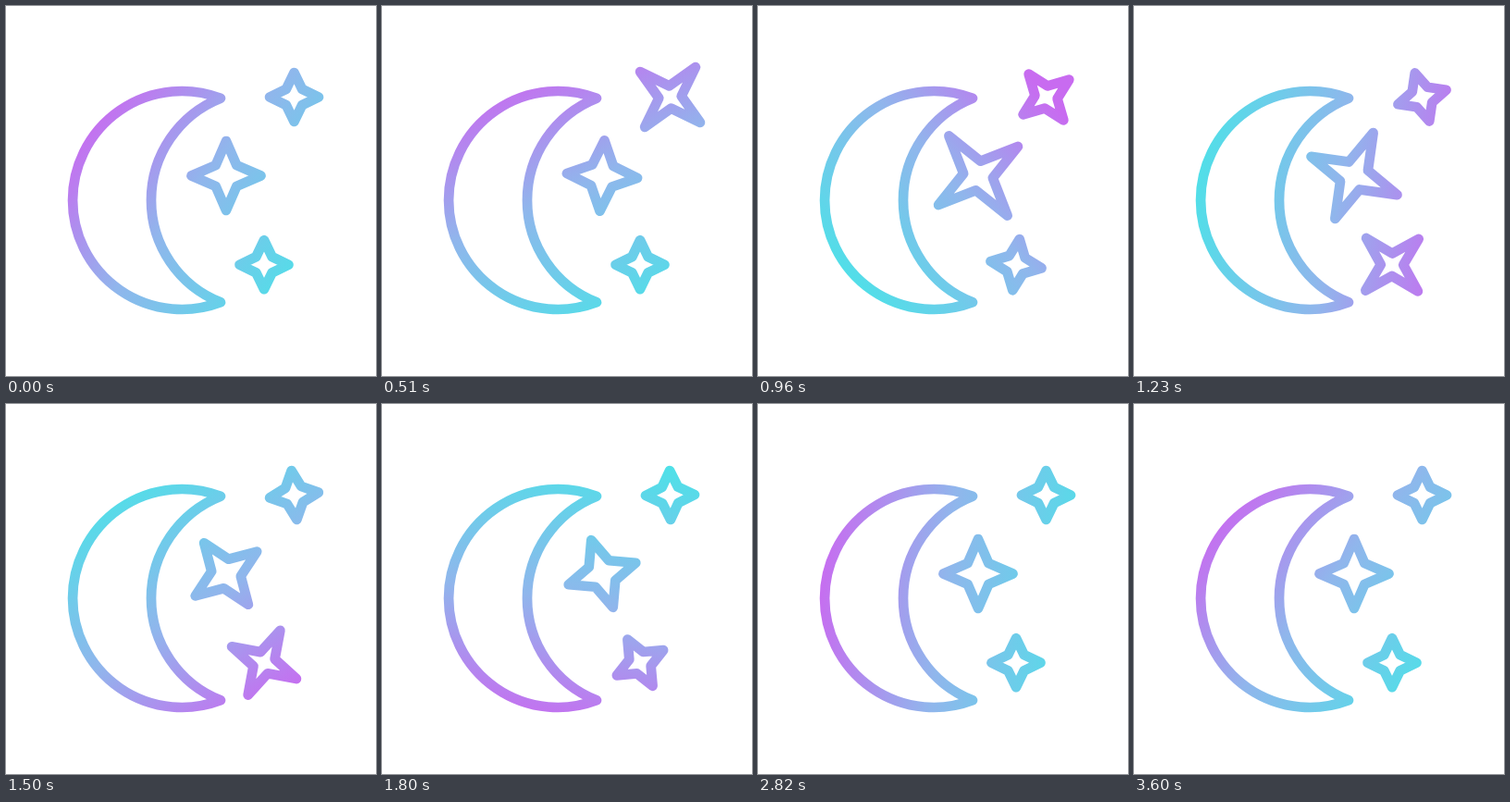
An HTML page for the animation above (5.63 s loop, 400x400 px).

```html
<!DOCTYPE html>
<html lang="en">
<head>
<meta charset="utf-8">
<title>Moon and stars</title>
<style>
  html, body { margin: 0; width: 100%; height: 100%; overflow: hidden; background: #fff; }
  svg { display: block; width: 100%; height: 100%; }
</style>
</head>
<body>
<svg viewBox="0 0 400 400">
  <defs>
    <linearGradient id="sheen" gradientUnits="userSpaceOnUse" x1="62" y1="205" x2="358" y2="205">
      <stop offset="0" stop-color="#c86bf0"/>
      <stop offset=".47" stop-color="#90b6ec"/>
      <stop offset="1" stop-color="#4fe0e8"/>
    </linearGradient>
  </defs>
  <g id="art" fill="none" stroke="url(#sheen)" stroke-width="10.7" stroke-linejoin="round" stroke-linecap="round">
    <path d="M232 99.7A118 118 0 1 0 232 320.3A118.6 118.6 0 0 1 232 99.7Z"/>
  </g>
</svg>
<script>
const LOOP = 5630, ACTIVE = 3600, STEP = 30;

// Centre, outer and inner radius, extra reach at the peak, start and duration in ms
const stars = [
  { x: 311.5, y: 98.5, r: 26.5, inner: 12.2, grow: 23.5, start: 0, dur: 2040 },
  { x: 238, y: 183.5, r: 37.5, inner: 16, grow: 18.5, start: 240, dur: 2640 },
  { x: 279, y: 279.7, r: 26.5, inner: 12.2, grow: 18, start: 650, dur: 2230 }
];

const sheenAngle = curve([[0, 38], [510, 66], [960, 138], [1230, 190], [1500, 238], [2220, 322], [3600, 398]]);
const reach = curve([[0, 0], [.13, .06], [.25, .68], [.3, 1], [.38, .7], [.47, .2], [.6, .03], [.75, 0], [1, 0]]);

// Smooth curve through points, without overshoot
function curve(pts) {
  const slope = i => (pts[i + 1][1] - pts[i][1]) / (pts[i + 1][0] - pts[i][0]);
  const tangent = pts.map((p, i) => {
    if (i === 0 || i === pts.length - 1) return 0;
    const a = slope(i - 1), b = slope(i);
    return a * b > 0 ? 2 * a * b / (a + b) : 0;
  });
  return x => {
    let i = 0;
    while (i < pts.length - 2 && x > pts[i + 1][0]) i++;
    const [x0, y0] = pts[i], [x1, y1] = pts[i + 1];
    const h = x1 - x0, u = (x - x0) / h, v = 1 - u;
    return y0 * (1 + 2 * u) * v * v + y1 * u * u * (3 - 2 * u)
      + h * u * v * (tangent[i] * v - tangent[i + 1] * u);
  };
}

// cubic-bezier(.47, 0, .07, 1)
function ease(x) {
  let lo = 0, hi = 1;
  for (let i = 0; i < 24; i++) {
    const s = (lo + hi) / 2, v = 1 - s;
    if (3 * v * v * s * .47 + 3 * v * s * s * .07 + s ** 3 < x) lo = s; else hi = s;
  }
  return lo * lo * (3 - 2 * lo);
}

function starPath(s, outer, turn) {
  let d = "";
  for (let i = 0; i < 8; i++) {
    const a = turn + i * Math.PI / 4, r = i % 2 ? s.inner : outer;
    d += (i ? "L" : "M") + (s.x + r * Math.sin(a)).toFixed(2) + " " + (s.y - r * Math.cos(a)).toFixed(2);
  }
  return d + "Z";
}

const sheen = document.getElementById("sheen");
const art = document.getElementById("art");
for (const s of stars) {
  s.el = document.createElementNS("http://www.w3.org/2000/svg", "path");
  art.append(s.el);
}

function draw(t) {
  sheen.setAttribute("gradientTransform", `rotate(${sheenAngle(t).toFixed(2)} 210 205)`);
  for (const s of stars) {
    const u = Math.min(1, Math.max(0, (t - s.start) / s.dur));
    s.el.setAttribute("d", starPath(s, s.r + s.grow * reach(u), u < 1 ? ease(u) * Math.PI : 0));
  }
}

const began = performance.now();
function tick() {
  const t = (performance.now() - began) % LOOP;
  draw(Math.min(ACTIVE, Math.floor(t / STEP) * STEP));
  requestAnimationFrame(tick);
}
tick();
</script>
</body>
</html>
```
